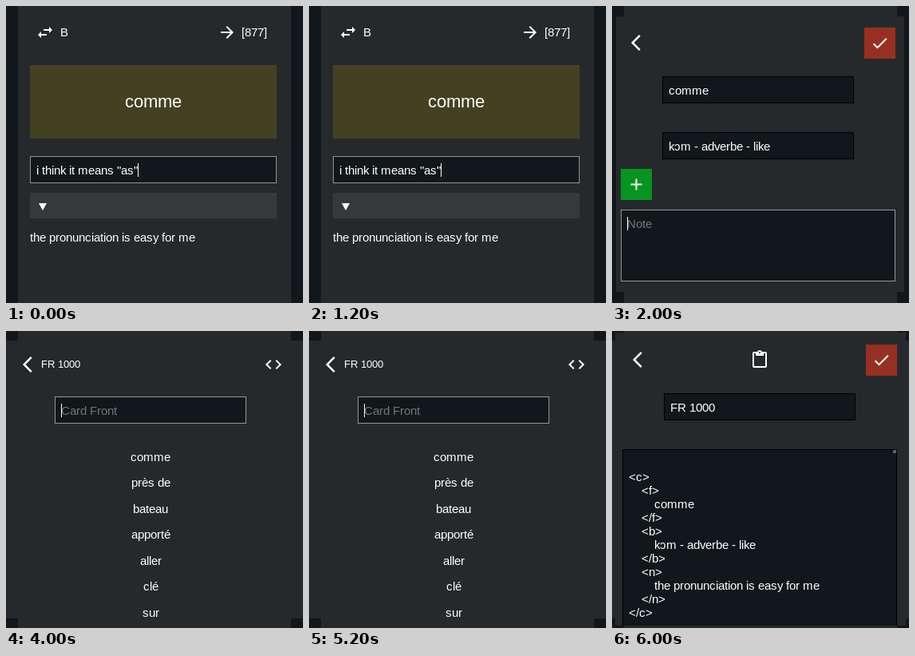
These frames come from a looping animation (372 by 372 pixels, 8000 ms). An HTML page:

```html
<!DOCTYPE html>
<html lang="en">
<head>
<meta charset="utf-8">
<title>Flash cards</title>
<style>
  html, body { margin: 0; width: 100%; height: 100%; overflow: hidden; background: #11171a; }
  svg { display: block; width: 372px; height: 372px; }
  text { font-family: "Liberation Sans", Arial, sans-serif; white-space: pre; }
</style>
</head>
<body>
<svg id="stage" viewBox="0 0 372 372"></svg>
<script>
const NS = "http://www.w3.org/2000/svg";
const STEP = 2000, LOOP = 8000;
const DARK = "#11171a", PANEL = "#25292c", GREY = "#949697", WHITE = "#fff";
const HINT = "#757575", RED = "#973022", GREEN = "#08951f";

const ICONS = {
  swap: "M6.99 11L3 15l3.99 4v-3H14v-2H6.99v-3zM21 9l-3.99-4v3H10v2h7.01v3L21 9z",
  next: "M12 4l-1.41 1.41L16.17 11H4v2h12.17l-5.58 5.59L12 20l8-8z",
  back: "M11.67 3.87L9.9 2.1 0 12l9.9 9.9 1.77-1.77L3.54 12z",
  check: "M9 16.17L4.83 12l-1.42 1.41L9 19 21 7l-1.41-1.41z",
  plus: "M19 13h-6v6h-2v-6H5v-2h6V5h2v6h6v2z",
  code: "M9.4 16.6L4.8 12l4.6-4.6L8 6l-6 6 6 6 1.4-1.4zm5.2 0l4.6-4.6-4.6-4.6L16 6l6 6-6 6-1.4-1.4z",
  paste: "M19 2h-4.18C14.4.84 13.3 0 12 0c-1.3 0-2.4.84-2.82 2H5c-1.1 0-2 .9-2 2v16c0 1.1.9 2 2 2h14c1.1 0 2-.9 2-2V4c0-1.1-.9-2-2-2zm-7 0c.55 0 1 .45 1 1s-.45 1-1 1-1-.45-1-1 .45-1 1-1zm7 18H5V4h2v3h10V4h2v16z",
  drop: "M0 0h10l-5 9z"
};

const pen = document.createElement("canvas").getContext("2d");
let layer;

function add(tag, attrs, parent = layer) {
  const el = document.createElementNS(NS, tag);
  for (const key in attrs) el.setAttribute(key, attrs[key]);
  return parent.appendChild(el);
}

// Whole-pixel advances, as in hinted screen text
function advance(ch, size) {
  if (size === 15 && "kvxyz".includes(ch)) return 7;
  return Math.round(pen.measureText(ch).width + 0.02);
}

function text(str, x, y, { size = 15, fill = WHITE, center = false } = {}) {
  pen.font = size + 'px "Liberation Sans", Arial, sans-serif';
  const widths = [...str].map(ch => advance(ch, size));
  if (center) x -= Math.floor(widths.reduce((a, b) => a + b, 0) / 2);
  const xs = widths.map(w => (x += w) - w);
  add("text", { x: xs.join(" "), y, "font-size": size, fill }).textContent = str;
}

const rect = (x, y, width, height, fill) => add("rect", { x, y, width, height, fill });

function field(x, y, w, h, border) {
  rect(x, y, w, h, border);
  rect(x + 1, y + 1, w - 2, h - 2, DARK);
}

const caret = (x, y) => rect(x, y, 1, 17, WHITE);

const icon = (name, x, y) =>
  add("path", { d: ICONS[name], fill: WHITE, transform: `translate(${x} ${y})` });

function button(name, x, y, fill) {
  rect(x, y, 39, 39, fill);
  icon(name, x + 7.5, y + 7.5);
}

const column = () => rect(15, 0, 342, 372, PANEL);

function quiz() {
  column();
  icon("swap", 37, 21);
  text("B", 68, 38);
  icon("next", 265, 21);
  text("[877]", 295, 38);
  rect(30, 74, 309, 92, "#434122");
  text("comme", 149, 127, { size: 22 });
  field(30, 188, 309, 34, GREY);
  text('i think it means "as"', 38, 211);
  caret(165, 197);
  rect(30, 234, 309, 32, "#35393c");
  icon("drop", 41, 247);
  text("the pronunciation is easy for me", 30, 295);
}

function edit() {
  column();
  rect(5, 13, 361, 345, PANEL);
  icon("back", 24, 34);
  button("check", 316, 27, RED);
  field(63, 88, 240, 34, "#000");
  text("comme", 71, 111);
  field(63, 158, 240, 34, "#000");
  text("kɔm - adverbe - like", 71, 181);
  button("plus", 11, 204, GREEN);
  field(11, 255, 344, 90, GREY);
  text("Note", 19, 278, { fill: HINT });
  caret(19, 264);
}

function deck() {
  column();
  rect(0, 12, 372, 348, PANEL);
  icon("back", 21, 30);
  text("FR 1000", 44, 46, { size: 13 });
  icon("code", 323, 30);
  field(61, 82, 240, 34, GREY);
  text("Card Front", 69, 105, { fill: HINT });
  caret(69, 91);
  ["comme", "près de", "bateau", "apporté", "aller", "clé", "sur"].forEach((word, i) =>
    text(word, 181, Math.floor(163 + i * 32.5), { center: true }));
}

function markup() {
  column();
  rect(0, 12, 372, 348, PANEL);
  rect(4, 2, 364, 367, PANEL);
  icon("back", 26, 24);
  icon("paste", 173, 24);
  button("check", 318, 17, RED);
  field(65, 78, 240, 34, "#000");
  text("FR 1000", 73, 101);
  rect(13, 148, 344, 221, "#000");
  rect(14, 149, 342, 220, DARK);
  rect(352, 149, 4, 4, "#606466");
  const lines = [
    [0, "<c>"], [1, "<f>"], [2, "comme"], [1, "</f>"],
    [1, "<b>"], [2, "kɔm - adverbe - like"], [1, "</b>"],
    [1, "<n>"], [2, "the pronunciation is easy for me"], [1, "</n>"], [0, "</c>"]
  ];
  lines.forEach(([depth, str], i) => text(str, 21 + depth * 16, 188 + i * 17));
}

const stage = document.getElementById("stage");
[quiz, edit, deck, markup].forEach((draw, i) => {
  layer = add("g", {}, stage);
  draw();
  layer.animate([
    { opacity: 1, offset: 0, easing: "step-end" },
    { opacity: 0, offset: STEP / LOOP, easing: "step-end" },
    { opacity: 0, offset: 1 }
  ], { duration: LOOP, iterations: Infinity, delay: i * STEP - LOOP });
});
</script>
</body>
</html>
```
